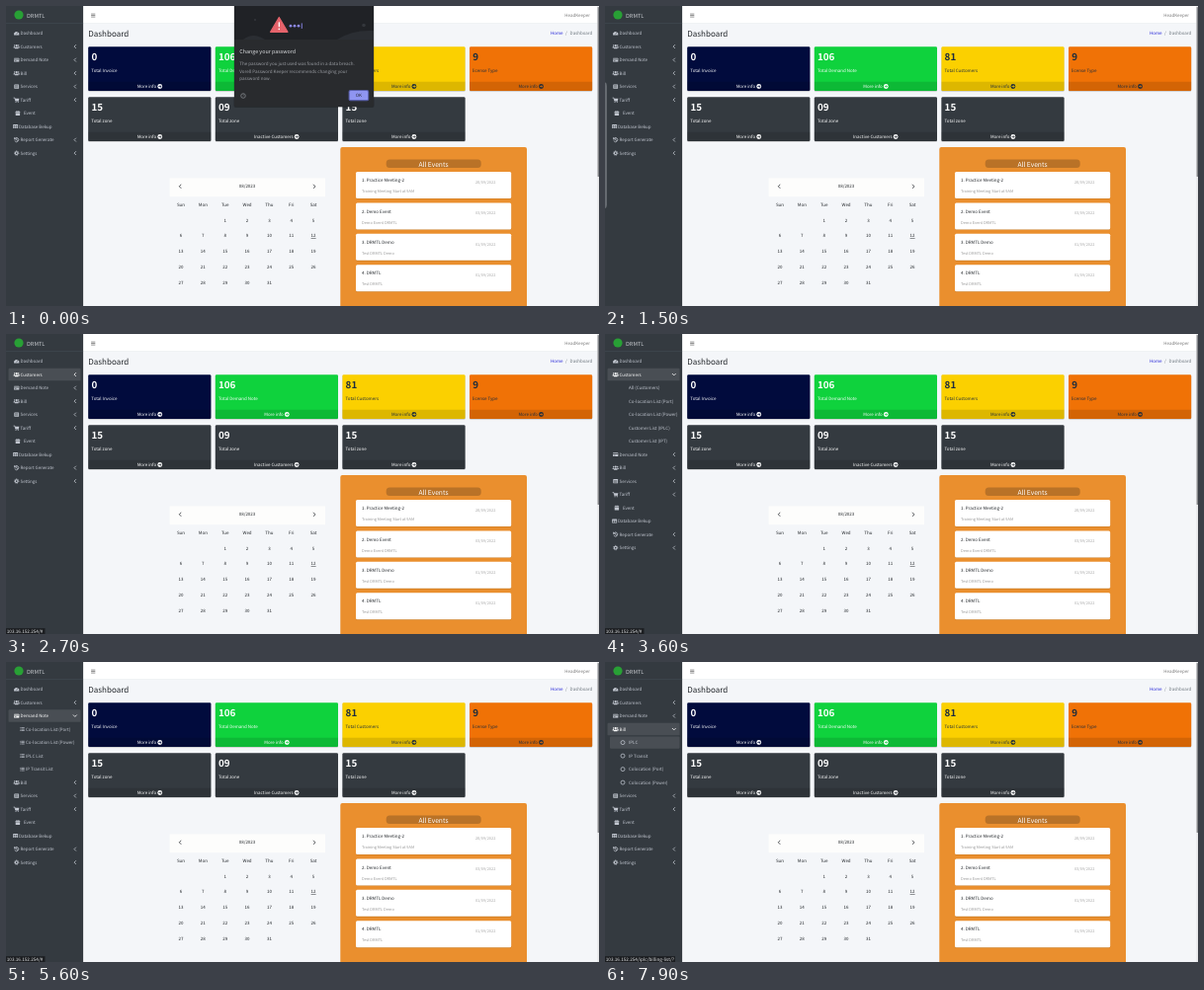
Animation of 600 by 304 pixels, one loop 8000 ms. Source, as an HTML page:

```html
<!DOCTYPE html>
<html lang="en">
<head>
<meta charset="utf-8">
<title>Dashboard</title>
<style>
html, body { margin: 0; width: 100%; height: 100%; overflow: hidden; background: #f4f6f9; }
svg { display: block; }
#stage { width: 600px; height: 304px; }
text { font-family: "Noto Sans CJK JP", "Noto Sans CJK SC", "Noto Sans CJK KR", "Noto Sans", sans-serif; text-rendering: geometricPrecision; white-space: pre; }
.line { fill: none; stroke: currentColor; stroke-width: .8; stroke-linecap: round; stroke-linejoin: round; }
</style>
</head>
<body>
<svg id="stage" viewBox="0 0 600 304" xmlns="http://www.w3.org/2000/svg"></svg>
<script>
const LOOP = 8000, STEP = 100, ROW = 13.5, TOP = 27.6;
const FONT_SCALE = 0.894; // the CJK family draws its Latin letters larger
const ORG = "DRMTL", HOST = "103.16.152.254/";
const stage = document.getElementById("stage");

// y is the middle of the capitals
function text(x, y, s, o = {}) {
  const size = o.size || 5;
  return `<text x="${x}" y="${(y + size * 0.335).toFixed(2)}" font-size="${(size * FONT_SCALE).toFixed(3)}"` +
    ` fill="${o.fill || "currentColor"}" text-anchor="${o.anchor || "start"}" font-weight="${o.bold ? 700 : 400}">${s}</text>`;
}
function rect(x, y, w, h, fill, r = 0, extra = "") {
  return `<rect x="${x}" y="${y}" width="${w}" height="${h}" rx="${r}" fill="${fill}" ${extra}/>`;
}
function circle(x, y, r, fill, extra = "") {
  return `<circle cx="${x}" cy="${y}" r="${r}" fill="${fill}" ${extra}/>`;
}
function line(d, extra = "") {
  return `<path class="line" d="${d}" ${extra}/>`;
}
function group(x, y, body, extra = "") {
  return `<g transform="translate(${x} ${y})" ${extra}>${body}</g>`;
}

const ink = "currentColor";
const people = circle(0, -1, 1.1, ink) + circle(-2, -1.1, .7, ink) + circle(2, -1.1, .7, ink) +
  `<path d="M-1.8 2.1v-.8q0-1 1.8-1t1.8 1v.8zM-3.1 1.4v-.7q0-.9 1.4-.8l-.1 1.5zM3.1 1.4v-.7q0-.9-1.4-.8l.1 1.5z" fill="${ink}"/>`;
const icons = {
  gauge: `<path d="M-2.6 1.9A2.7 2.7 0 1 1 2.6 1.9z" fill="${ink}"/><path d="M0 1L1.2-1.2" stroke="#343a40" stroke-width=".6"/>`,
  people,
  card: rect(-2.7, -1.9, 5.4, 3.8, ink, .5) + rect(-2.7, -1, 5.4, .8, "#343a40") + rect(-2, .7, 1.8, .5, "#343a40"),
  form: rect(-2.4, -2.1, 4.8, 4.2, ink, .5) + [-.8, .3, 1.3].map(y => rect(-1.7, y - .3, 3.4, .45, "#343a40")).join(""),
  cart: `<path d="M-1.7-1.4H2.7L2.1.8H-1.2z" fill="${ink}"/>` + line("M-2.7-2H-1.8L-1 1.1H2") + circle(-.7, 2.1, .55, ink) + circle(1.6, 2.1, .55, ink),
  date: rect(-2.2, -1.8, 4.4, 4.2, ink, .5) + rect(-1.3, -2.5, .7, 1.2, ink) + rect(.6, -2.5, .7, 1.2, ink) + rect(-2.2, -.7, 4.4, .4, "#343a40"),
  table: rect(-2.5, -2, 5, 4, ink, .5) + [-1.8, .3].map(x => rect(x, -.8, 1.5, .8, "#343a40") + rect(x, .6, 1.5, .8, "#343a40")).join(""),
  past: line("M-1.9-1.1A2.1 2.1 0 1 1-1.7 1.3M-2.2-2V-.8H-1M0-1V.2L.8.7"),
  gear: circle(0, 0, 1.4, "none", `stroke="${ink}" stroke-width="1.1"`) +
    circle(0, 0, 2.2, "none", `stroke="${ink}" stroke-width=".8" stroke-dasharray=".86 .868"`),
  list: [-1.4, 0, 1.4].map(y => circle(-2, y, .45, ink) + rect(-1, y - .35, 3.4, .7, ink)).join(""),
  ring: circle(0, 0, 2, "none", `stroke="${ink}" stroke-width=".75"`)
};

const menu = [
  { name: "Dashboard", icon: "gauge" },
  { name: "Customers", icon: "people", subs: ["All (Customers)", "Co-location List (Port)", "Co-location List (Power)", "Customer List (IPLC)", "Customer List (IPT)"] },
  { name: "Demand Note", icon: "card", subIcon: "list", subs: ["Co-location List (Port)", "Co-location List (Power)", "IPLC List", "IP Transit List"] },
  { name: "Bill", icon: "people", subIcon: "ring", subs: ["IPLC", "IP Transit", "Colocation (Port)", "Colocation (Power)"] },
  { name: "Services", icon: "form", arrow: true },
  { name: "Tariff", icon: "cart", arrow: true },
  { name: "Event", icon: "date", indent: 4 },
  { name: "Database Bekup", icon: "table", tight: true },
  { name: "Report Generate", icon: "past", arrow: true },
  { name: "Settings", icon: "gear", arrow: true }
];

function subItem(m, s, i) {
  const y = ROW * (i + .5);
  const left = m.subIcon === "list" ? 20 : 24;
  const mark = m.subIcon ? group(m.subIcon === "list" ? 16.3 : 18, y, icons[m.subIcon]) : "";
  const glow = m.name === "Bill" && i === 0 ? rect(5, y - 6.2, 70.5, 12.4, "#fff", 1.2, 'id="subGlow" fill-opacity=".1"') : "";
  return glow + mark + text(left, y, s);
}
function menuRow(m, i) {
  const dx = m.indent || 0;
  const arrow = m.subs || m.arrow ? `<g id="arrow${i}">${line("M.8-1.6L-.8 0L.8 1.6")}</g>` : "";
  const subs = m.subs ? `<svg id="subs${i}" x="0" y="${ROW / 2}" width="78" height="0" overflow="hidden" color="#c2c7d0">` +
    m.subs.map((s, k) => subItem(m, s, k)).join("") + "</svg>" : "";
  return `<g id="row${i}">` + rect(2.5, -6.25, 73.1, 12.5, "#fff", 1.2, `id="glow${i}" fill-opacity=".1"`) +
    group((m.tight ? 9.6 : 10.7) + dx * .3, 0, icons[m.icon]) + text((m.tight ? 13 : 14.5) + dx * .85, 0, m.name) + arrow + subs + "</g>";
}
function sidebar() {
  return rect(0, 0, 78.1, 304, "#343a40") + rect(0, 17.6, 78.1, .4, "#4b545c") +
    circle(13, 9, 4.6, "#28a035") + text(21, 9.5, ORG, { size: 6.25, fill: "#c9ccd0" }) +
    `<g color="#c2c7d0">${menu.map(menuRow).join("")}</g>`;
}

function infoBox(col, y, fill, num, label, more, color) {
  const x = 83.2 + col * 128.6, w = 124.2, mid = x + w / 2;
  const end = mid + (more === "More info" ? 10.4 : 20.2);
  const go = circle(0, 0, 2.4, ink) + `<path d="M-1.4 0H1.2M.1-1.2L1.3 0L.1 1.2" fill="none" stroke="${fill}" stroke-width=".75"/>`;
  return `<g color="${color}">` + rect(x, y + .5, w, 44.9, "#000", 1.3, 'opacity=".18"') + rect(x, y, w, 44.8, fill, 1.3) +
    rect(x, y + 35.4, w, 9.4, "#000", 0, 'opacity=".12"') +
    text(x + 3.2, y + 9.8, num, { size: 11, bold: true }) + text(x + 3.1, y + 23.6, label) +
    text(end - 3.5, y + 40.2, more, { anchor: "end" }) + group(end, y + 40.2, go) + "</g>";
}
function calendar() {
  const x = i => 177 + i * 22.35;
  const mid = { anchor: "middle", fill: "#24282c" };
  let s = rect(165.7, 174.3, 157.3, 18.9, "#fdfdfc") + text(244, 182.8, "08/2023", mid) +
    `<g color="#24282c">` + line("M177-0M177 181.1L175.3 182.8L177 184.5M311.3 181.1L313 182.8L311.3 184.5", 'stroke-width=".6"') + "</g>";
  "Sun Mon Tue Wed Thu Fri Sat".split(" ").forEach((d, i) => s += text(x(i), 201.5, d, mid));
  for (let d = 1; d <= 31; d++) {
    const cell = d + 1;
    s += text(x(cell % 7), 217 + Math.floor(cell / 7) * 15.75, d, mid);
  }
  return s + rect(308.6, 235.2, 5, .5, "#24282c");
}
function events() {
  const list = [
    ["Practice Meeting-2", "Training Meeting Start at 9AM", "28/09/2022"],
    ["Demo Event", "Demo Event " + ORG, "03/09/2022"],
    [ORG + " Demo", `Test ${ORG} Demo`, "01/09/2022"],
    [ORG, "Test " + ORG, "01/09/2022"]
  ];
  return rect(338.3, 143, 188.7, 170, "#ea8f2e", 2) + rect(384.7, 155.5, 96, 8.5, "#b97227", 3.5) +
    text(432.5, 160, "All Events", { size: 7.5, fill: "#fff", anchor: "middle" }) +
    list.map(([title, note, date], i) => {
      const y = 168 + i * 31.4;
      return rect(354, y + .6, 157.2, 27, "#7a4205", 1.5, 'opacity=".3"') + rect(354, y, 157.2, 27, "#fff", 1.5) +
        text(360, y + 8.6, `${i + 1}. ${title}`, { fill: "#24282c" }) +
        text(360, y + 19.8, note, { size: 4.375, fill: "#9a9a9a" }) +
        text(495.3, y + 10.6, date, { size: 4.375, fill: "#a8a8a8", anchor: "end" });
    }).join("");
}
function page() {
  const dark = "#1f2d3d", white = "#fff", slate = "#343a40", info = "More info";
  return rect(78.1, 0, 521.9, 304, "#f4f6f9") + rect(78.1, 0, 521.9, 17.7, white) + rect(78.1, 17.6, 521.9, .4, "#dee2e6") +
    [-1.5, 0, 1.5].map(y => rect(86.1, 9.2 + y, 4.2, .7, "#666")).join("") +
    text(591, 9.6, "HeadKeeper", { anchor: "end", fill: "#777" }) +
    text(83.3, 28.4, "Dashboard", { size: 9, fill: "#212529" }) +
    text(551, 27.8, "Home", { fill: "#2424d8" }) + text(566, 27.8, "/", { fill: "#6c757d" }) +
    text(593.3, 27.8, "Dashboard", { anchor: "end", fill: "#6c757d" }) +
    infoBox(0, 41.3, "#010b3d", "0", "Total Invoice", info, white) +
    infoBox(1, 41.3, "#0fd23d", "106", "Total Demand Note", info, white) +
    infoBox(2, 41.3, "#fbd000", "81", "Total Customers", info, dark) +
    infoBox(3, 41.3, "#f07206", "9", "license Type", info, dark) +
    infoBox(0, 92.3, slate, "15", "Total zone", info, white) +
    infoBox(1, 92.3, slate, "09", "Total zone", "Inactive Customers", white) +
    infoBox(2, 92.3, slate, "15", "Total zone", info, white) +
    calendar() + events() +
    rect(598.3, 0, 1.7, 304, "#e9eaec") + rect(598.6, 1, 1.4, 172, "#85878a", .6);
}

function popup() {
  const grey = { size: 5.07, fill: "#9a9da3" };
  return `<g id="popup">` + rect(230.5, -3, 142, 106, "#000", 2, 'opacity=".25"') + rect(231, -3, 141, 105, "#292b2e", 2) +
    rect(231, 0, 141, 34, "#202226") +
    `<path d="M240 34q10-8 22 0zM335 34q15-10 37-9v9z" fill="#2b2e33"/>` +
    circle(362, 19.5, 1.8, "#34373c") + circle(252, 14, 1, "#34373c") +
    `<path d="M276.3 11.5L285 26.3H267.6z" fill="#e5636b" stroke="#e5636b" stroke-width="1.2" stroke-linejoin="round"/>` +
    rect(275.7, 16.2, 1.3, 5, "#fff", .5) + circle(276.3, 23.4, .8, "#fff") +
    [288, 292, 296].map(x => circle(x, 20.2, 1.35, "#8c88ee")).join("") + rect(298.8, 17.4, .9, 5.5, "#8c88ee") +
    text(236.3, 46, "Change your password", { size: 6, fill: "#dddfe2" }) +
    text(236.3, 58.2, "The password you just used was found in a data breach.", grey) +
    text(236.3, 66, "Vorell Password Keeper recommends changing your", grey) +
    text(236.3, 73.6, "password now.", grey) +
    circle(240, 91, 2.3, "none", 'stroke="#8d9095" stroke-width=".7"') + text(240, 91, "?", { size: 3.6, fill: "#9a9da3", anchor: "middle" }) +
    rect(346.6, 85, 20.6, 11.2, "#595fa8", 1.8) + rect(347.7, 86.1, 18.4, 9, "#8f95f2", 1.2) +
    text(356.9, 90.6, "OK", { fill: "#24262c", anchor: "middle" }) + "</g>";
}

function dock() {
  const pad = [-1, 0, 1];
  const terminal = rect(-7, -6.3, 14, 12.6, "#d8d8d8", 1.5) + rect(-6.3, -5.7, 12.6, 11.4, "#17191b", 1) + text(-4.8, -1.2, "$_", { size: 5, fill: "#fff", bold: true });
  const notes = rect(-7, -5, 14, 11, "#f2f3ee", 1) + rect(-7, -6, 14, 3.4, "#4aa3a0", 1) +
    [-5, -2.5, 0, 2.5, 5].map(x => rect(x - .4, -7, .8, 2.4, "#26292b")).join("") + rect(-5, 0, 10, .7, "#c9cbc6") + rect(-5, 2.4, 7, .7, "#c9cbc6");
  const doc = rect(-5, -6.8, 10.4, 13.6, "#f4f4f4", 1) + [-4, -1.8, .4].map(y => rect(-3.3, y, 6.4, .7, "#b8b8b8")).join("") +
    circle(4, 3.6, 3.5, "#b5262e") + `<path d="M2.6 5L5.4 2.2" stroke="#fff" stroke-width="1"/>`;
  const apps = pad.map(i => pad.map(j => circle(i * 3.9, j * 3.9, 1.25, "#eee")).join("")).join("");
  return `<g id="dock">` + rect(1, 77, 22.3, 128.5, "#92969b", 4, 'opacity=".55"') +
    rect(3.2, 142, 18, 20, "#aeb2b6", 2.5, 'opacity=".45"') +
    pad.map(i => circle(2.6, 152.3 + i * 3.2, .8, "#eee")).join("") + circle(2.6, 173.3, .8, "#eee") +
    group(12.2, 88.5, terminal) + group(12.2, 110.5, notes) + group(12.2, 131, doc) +
    circle(12.2, 152.3, 6.7, "#dc4437") + rect(6.2, 167.5, 12, 12, "#2489ca", 1) + group(12.2, 194.3, apps) + "</g>" +
    `<g id="tip">` + rect(24, 125.8, 29.5, 10, "#3b3f44", 2.2) + text(38.8, 130.8, "Text Editor", { size: 4.7, fill: "#eee", anchor: "middle" }) + "</g>";
}

function statusBar() {
  const bar = (id, w, path) => `<g id="${id}">` + rect(0, 298.2, w, 5.8, "#1b1d20") + text(.8, 301.2, HOST + path, { size: 5.2, fill: "#e4e6e8" }) + "</g>";
  return bar("hash", 39.5, "#") + bar("link", 71, "iplc/billing-list/?");
}

stage.innerHTML = page() + sidebar() + statusBar() + dock() + popup();

const el = id => document.getElementById(id);
const show = (id, on) => el(id).setAttribute("visibility", on ? "visible" : "hidden");
const move = (id, v) => el(id).setAttribute("transform", v);
const swing = (t, a, b) => .5 - Math.cos(Math.PI * Math.min(1, Math.max(0, (t - a) / (b - a)))) / 2;
const within = (t, a, b) => t >= a && t < b;

// per row: highlighted from..to, opening and closing times
const plan = {
  1: { hot: [2700, 5100], open: [3200, 3600], close: [4350, 4800] },
  2: { hot: [5100, 6500], open: [5200, 5600], close: [5850, 6300] },
  3: { hot: [6500, LOOP], open: [6800, 7300], close: [LOOP, LOOP + 1] }
};

function draw(t) {
  let y = TOP;
  menu.forEach((m, i) => {
    const p = plan[i];
    const open = p ? swing(t, ...p.open) - swing(t, ...p.close) : 0;
    const hot = !!p && within(t, ...p.hot);
    move("row" + i, `translate(0 ${y.toFixed(2)})`);
    el("row" + i).style.color = hot ? "#fff" : "";
    show("glow" + i, hot);
    if (m.subs || m.arrow) move("arrow" + i, `translate(69.8 0) rotate(${-90 * open})`);
    if (m.subs) {
      const h = ROW * m.subs.length * open;
      el("subs" + i).setAttribute("height", h.toFixed(2));
      y += h;
    }
    y += ROW;
  });

  const onLink = t >= 7900;
  show("subGlow", onLink);
  show("link", onLink);
  show("hash", t >= 2700 && !onLink);

  const docked = swing(t, 1400, 1800) - swing(t, 2300, 2700);
  move("dock", `translate(${(-25 * (1 - docked)).toFixed(2)} 0)`);
  show("dock", docked > 0);
  show("tip", within(t, 1900, 2400));

  el("popup").setAttribute("opacity", (1 - swing(t, 0, 300)).toFixed(3));
}

function frame(now) {
  draw(Math.floor((now % LOOP) / STEP) * STEP);
  requestAnimationFrame(frame);
}
draw(0);
requestAnimationFrame(frame);
</script>
</body>
</html>
```
